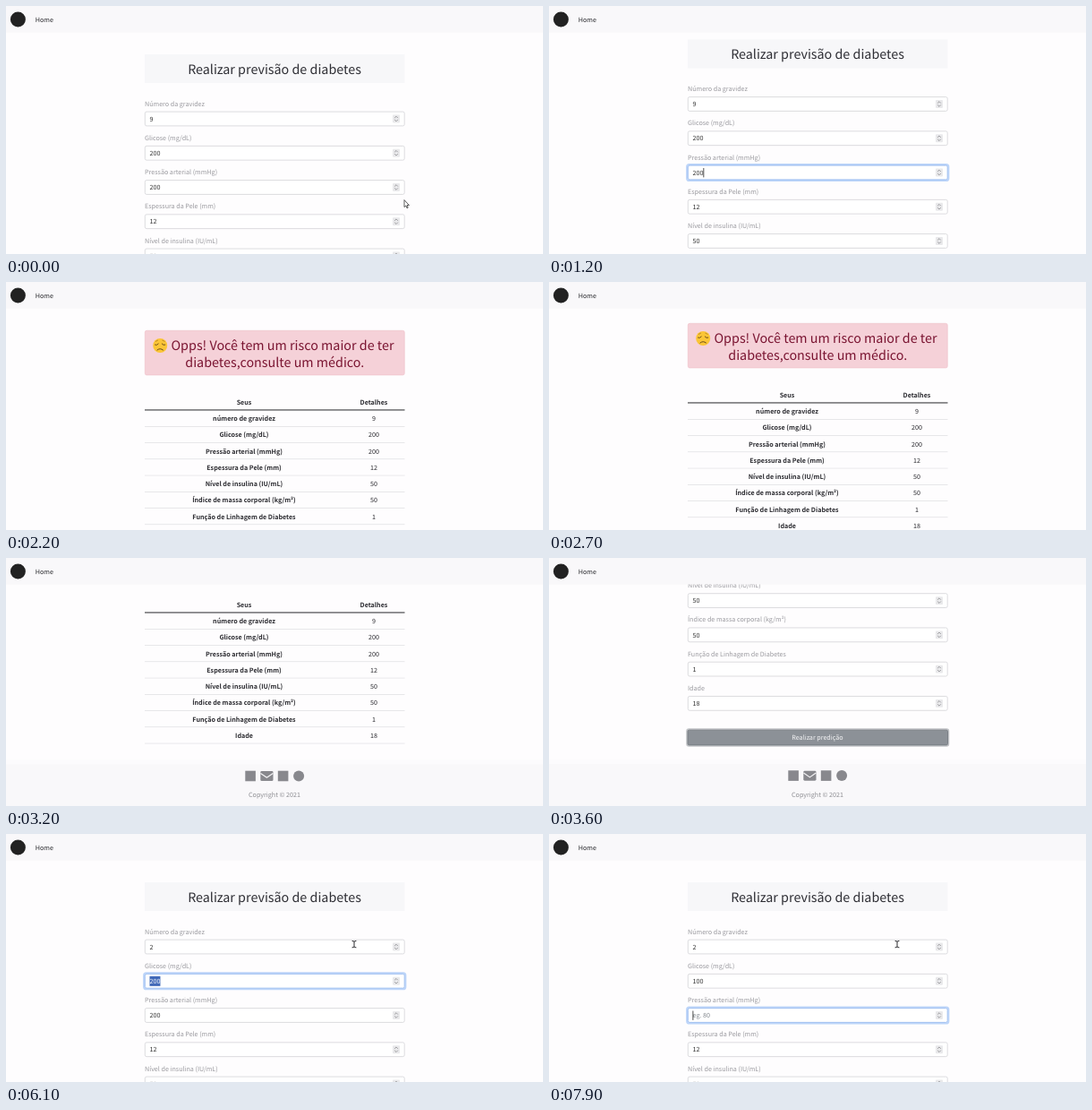
Write an HTML page that moves like this. It is 600x277 px and loops after 8 s.

```html
<!DOCTYPE html>
<html lang="pt">
<head>
<meta charset="utf-8">
<title>Previsão de diabetes</title>
<style>
html, body { margin: 0; width: 100%; height: 100%; overflow: hidden; background: #fefdfe; }
svg { display: block; width: 100vw; height: 100vh; }
text {
  font-family: "Noto Sans CJK JP", "Noto Sans CJK SC", "Noto Sans CJK", "Open Sans", sans-serif;
  font-size: 7.165px; text-rendering: geometricPrecision; white-space: pre;
}
.big { font-size: 14.33px; font-weight: 500; }
.mid { text-anchor: middle; }
.bold { font-weight: 700; }
</style>
</head>
<body>
<svg id="stage" viewBox="0 0 600 277"></svg>
<script>
const LOOP = 8000, STEP = 100;
const LEFT = 155, WIDTH = 290.5, PITCH = 38.25;
const NS = 'http://www.w3.org/2000/svg';
const stage = document.getElementById('stage');

function el(parent, tag, attrs = {}, text) {
  const node = document.createElementNS(NS, tag);
  for (const k in attrs) node.setAttribute(k, attrs[k]);
  if (text !== undefined) node.textContent = text;
  parent.appendChild(node);
  return node;
}
const set = (node, attrs) => { for (const k in attrs) node.setAttribute(k, attrs[k]); };
const show = (node, on) => node.setAttribute('visibility', on ? 'visible' : 'hidden');
const group = parent => el(parent, 'g');
const rect = (p, x, y, width, height, fill, more) => el(p, 'rect', { x, y, width, height, fill, ...more });
const path = (p, d, stroke, width, fill = 'none') =>
  el(p, 'path', { d, stroke, 'stroke-width': width, fill, 'stroke-linecap': 'round', 'stroke-linejoin': 'round' });
const label = (p, x, y, text, fill, cls = '') => el(p, 'text', { x, y, fill, class: cls }, text);

// Linear interpolation through [time, ...values] rows
function track(rows, t) {
  let i = 0;
  while (i < rows.length - 1 && rows[i + 1][0] <= t) i++;
  const a = rows[i], b = rows[i + 1];
  if (!b || t <= a[0]) return a.slice(1);
  const k = (t - a[0]) / (b[0] - a[0]);
  return a.slice(1).map((v, n) => v + (b[n + 1] - v) * k);
}

const FIELDS = [
  ['Número da gravidez', '9'],
  ['Glicose (mg/dL)', '200', 'eg. 100'],
  ['Pressão arterial (mmHg)', '200', 'eg. 80'],
  ['Espessura da Pele (mm)', '12'],
  ['Nível de insulina (IU/mL)', '50'],
  ['Índice de massa corporal (kg/m²)', '50'],
  ['Função de Linhagem de Diabetes', '1'],
  ['Idade', '18']
];
const BUTTON = FIELDS.length;

// [time, focused item, new value, selected]
const ACTIONS = [
  [800, 2, '200'], [1900, BUTTON], [3900, -1],
  [4600, 0, '9', true], [5100, 0, '2'],
  [5400, 1, '200', true], [6200, 1, '1'], [6400, 1, '10'], [6600, 1, '100'],
  [6800, 2, '200', true], [7100, 2, '1'], [7400, 2, '10'], [7700, 2, '1'], [7800, 2, '']
];
const FORM_SCROLL = [
  [1100, 0], [1200, 16.5], [1300, 68], [1400, 135], [1500, 188], [1600, 214.4],
  [1800, 231.4], [3700, 231.4], [3800, 90], [3900, 0]
];
const RESULT_SCROLL = [[2200, 0], [2700, 8], [2800, 8], [3200, 82]];
const RESULT_FROM = 2100, RESULT_TO = 3300;
const ARROW = [[100, 445, 217], [400, 440, 205], [700, 412, 199], [1000, 400, 198]];
const BEAM = [[4100, 378, 142], [4400, 389, 123]];

function drawFooter(p, y) {
  const ink = '#88888d';
  rect(p, 0, y - 5, 600, 5, '#fcfbfd');
  rect(p, 0, y, 600, 60, '#f9f8fa');
  rect(p, 267.3, y + 7.2, 11.6, 11.6, ink);
  rect(p, 284.3, y + 7.6, 14.2, 11, ink, { rx: 1.4 });
  path(p, `M284.8 ${y + 10.2}L291.4 ${y + 14.8}L298 ${y + 10.2}`, '#f9f8fa', 1.1);
  rect(p, 303.8, y + 7.2, 11.6, 11.6, ink);
  el(p, 'circle', { cx: 327.1, cy: y + 13, r: 6, fill: ink });
  label(p, 300, y + 36.6, 'Copyright © 2021', '#8e8e93', 'mid');
}

function makeField(p, [name, , hint = ''], i) {
  const cy = 126 + i * PITCH, top = cy - 8.2;
  label(p, LEFT, cy - 14.4, name, '#99999e');
  const ring = rect(p, LEFT - .9, top - .9, WIDTH + 1.8, 18.2, 'none',
    { rx: 2.6, stroke: '#bdd5f9', 'stroke-width': 2 });
  const box = rect(p, LEFT + .3, top + .3, WIDTH - .6, 15.8, '#fff', { rx: 1.8, 'stroke-width': .8 });
  rect(p, 432, cy - 4.4, 8, 8.8, '#e9e9eb', { rx: .8 });
  path(p, `M434.4 ${cy - 1.2}l1.6-1.6 1.6 1.6M434.4 ${cy + 1.2}l1.6 1.6 1.6-1.6`, '#8b8b8f', .8);
  const mark = rect(p, 160.5, cy - 5.4, 0, 11, '#4169b8');
  const text = label(p, 160.5, cy + 2.7, '', '#333');
  const caret = rect(p, 160.5, cy - 5, .8, 10.4, '#222');

  return (value, focused, selected, glow, blink) => {
    const end = value.length * 3.98;
    show(ring, focused);
    set(ring, { opacity: glow });
    set(box, { stroke: focused ? '#8cb3ee' : '#d3d3d7' });
    set(mark, { width: selected ? end : 0 });
    text.textContent = value || hint;
    set(text, { fill: selected ? '#fff' : value ? '#333' : '#83888e' });
    set(caret, { x: 160.5 + end });
    show(caret, focused && !selected && blink);
  };
}

const form = group(stage);
rect(form, LEFT, 54, WIDTH, 32, '#f7f7f9');
label(form, 300, 75.7, 'Realizar previsão de diabetes', '#2f2f35', 'big mid');
const updaters = FIELDS.map((f, i) => makeField(form, f, i));
const buttonRing = rect(form, LEFT - .8, 422.7, WIDTH + 1.6, 18.4, 'none',
  { rx: 2.2, stroke: '#c3c5c8', 'stroke-width': 2 });
const button = rect(form, LEFT, 423.6, WIDTH, 16.7, '#8c9197', { rx: 1.4, 'stroke-width': .9 });
label(form, 300, 434.8, 'Realizar predição', '#f7f7f8', 'mid');
drawFooter(form, 461.5);

const result = group(stage);
rect(result, LEFT + .3, 54.3, WIDTH - .6, 49.6, '#f5d1d8', { rx: 1.8, stroke: '#efc2cb', 'stroke-width': .7 });
el(result, 'circle', { cx: 172.2, cy: 71, r: 8, fill: '#fbc536' });
path(result, 'M166.6 70.2q2 1 3.6-1.2M177.8 70.2q-2 1-3.6-1.2M168.9 76q3.3-2.8 6.6 0', '#6a4a1c', 1);
path(result, 'M167.2 66.4l2.4-1.3M177.2 66.4l-2.4-1.3', '#a8741d', .7);
label(result, 309, 76.2, 'Opps! Você tem um risco maior de ter', '#7a1431', 'big mid');
label(result, 300.3, 94.5, 'diabetes,consulte um médico.', '#7a1431', 'big mid');
const row = (y, name, value, cls) => {
  label(result, 266, y, name, '#2b2b30', 'mid bold');
  label(result, 411, y, value, '#2b2b30', cls);
};
row(137, 'Seus', 'Detalhes', 'mid bold');
rect(result, LEFT, 142.4, WIDTH, 1.1, '#3a3a3e');
FIELDS.forEach(([name, value], i) => {
  const y = 143 + i * 18.25;
  row(y + 12, i ? name : 'número de gravidez', value, 'mid');
  rect(result, LEFT, y + 18, WIDTH, .6, '#d9d9dd');
});
drawFooter(result, 312.5);

const nav = group(stage);
rect(nav, 0, 0, 600, 29.5, '#f9f8fa');
el(nav, 'circle', { cx: 13.4, cy: 15, r: 8.5, fill: '#222' });
label(nav, 32.8, 17.9, 'Home', '#29292d');

const arrow = path(stage, 'M0 0V7.6L1.8 6L3 8.8L4.2 8.2L3 5.6H5Z', '#333', .8, '#fff');
const beam = path(stage, 'M-2-3.6Q0-3.6 0-2.6Q0-3.6 2-3.6M0-2.6V2.8M-2 3.8Q0 3.8 0 2.8Q0 3.8 2 3.8', '#2b2b2f', 1);
const move = (node, x, y) => node.setAttribute('transform', `translate(${x} ${y})`);

function render(t) {
  const values = FIELDS.map(f => f[1]);
  let focus = -1, selected = false, edited = 0, focusedAt = 0;
  for (const [at, item, value, sel] of ACTIONS) {
    if (at > t) break;
    if (item !== focus) focusedAt = at;
    focus = item;
    edited = at;
    selected = !!sel;
    if (value !== undefined) values[item] = value;
  }
  const glow = Math.min(1, .5 + (t - focusedAt) / 200);
  const blink = (t - edited) % 1000 < 500;
  updaters.forEach((update, i) =>
    update(values[i], i === focus, i === focus && selected, glow, blink));

  const pressed = focus === BUTTON;
  show(buttonRing, pressed);
  set(button, { stroke: pressed ? '#777c82' : '#8c9197' });

  const onResult = t >= RESULT_FROM && t < RESULT_TO;
  form.setAttribute('display', onResult ? 'none' : 'inline');
  result.setAttribute('display', onResult ? 'inline' : 'none');
  move(form, 0, -track(FORM_SCROLL, t)[0]);
  move(result, 0, -track(RESULT_SCROLL, t)[0]);

  show(arrow, t < 700);
  show(beam, t >= 700 && t < 1000 || t >= 4100);
  move(arrow, ...track(ARROW, t));
  move(beam, ...track(t < 4100 ? ARROW : BEAM, t));
}

const start = performance.now();
function tick() {
  const t = (performance.now() - start) % LOOP;
  render(Math.floor(t / STEP) * STEP);
  requestAnimationFrame(tick);
}
tick();
</script>
</body>
</html>
```
